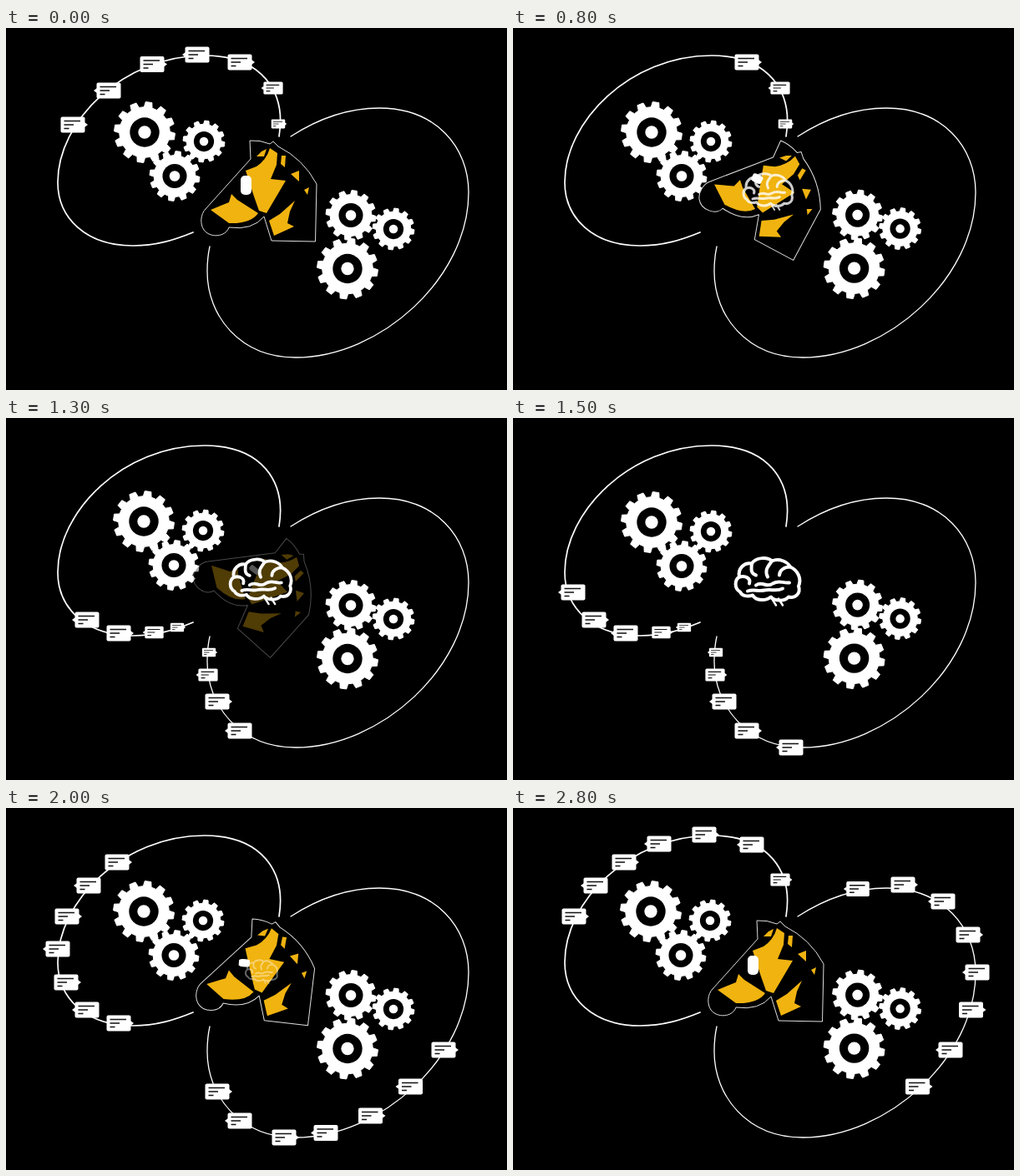
Recreate the animation shown at these times as an HTML page. Size 600 px wide and 434 px high, loop 3000 ms.

```html
<!DOCTYPE html>
<html lang="en">
<head>
<meta charset="utf-8">
<title>Thinking loops</title>
<style>
  html, body { margin: 0; width: 100%; height: 100%; overflow: hidden; background: #000; }
  svg { display: block; width: 100%; height: 100%; }
  .line { fill: none; stroke: #fff; stroke-linecap: round; stroke-linejoin: round; }
</style>
</head>
<body>
<svg viewBox="0 0 600 434">
  <defs>
    <g id="bubble">
      <rect x="-14.5" y="-9.5" width="29" height="19" rx="2" fill="#fff"/>
      <path d="M14-3L18 0 14 3Z" fill="#fff"/>
    </g>
    <path id="text" d="M-10.500-4.500H9M-10.500 0H1M-10.500 4.500H-4.500" stroke="#111" stroke-width="1.400"/>
  </defs>
  <path class="line" stroke-width="1.7" d="M327 130C336 75 305 33 238 33C140 33 62 112 62 185C62 228 96 261 152 261C180 261 202 254 224 245"/>
  <path class="line" stroke-width="1.3" d="M341 130C375 108 410 96 447 96C515 96 554 143 554 197C554 300 448 395 347 395C280 395 241 345 241 292C241 281 242 271 244 262"/>
  <g id="leftGears"></g>
  <g id="rightGears"></g>
  <g id="bubbles"></g>
  <g id="head">
    <path fill="#000" stroke="#ddd" stroke-width="1" stroke-linejoin="round" d="M293 157L292 135Q304 134 316 139L320 136 326 142Q356 157 372 187L370.500 256 318 255 309 226Q295 243 267 239C263 251 244 252 237 242C232 235 233 223 239 217Z"/>
    <g fill="#f0b310">
      <path d="M287 171L300 166Q312 158 316 144L325 150 324 164 317 181 335 183 312 222 303 219 297 202Z"/>
      <path d="M245 218L267 209 270 199 277 206 302 222Q293 235 267 234Z"/>
      <path d="M300 154L306 148 312 145 309 154Z"/>
      <path d="M330 153L335 153 334 167 329 163Z"/>
      <path d="M341 175L351 171 351 184Z"/>
      <path d="M357 194L363 191 361 200Z"/>
      <path d="M315 231L328 223 346 207 340 220 337 234 345 238 321 249Z"/>
    </g>
    <rect id="eye" x="-6.5" y="-11.5" width="13" height="23" rx="5" fill="#fff"/>
  </g>
  <g id="brain" class="line" stroke-width="4">
    <path d="M271 208C264 204 264 194 270 190C268 180 276 172 285 174C290 166 304 166 309 171C318 167 328 172 331 178C340 182 345 192 341 201C344 210 337 216 329 214C324 220 312 219 308 214C302 219 290 219 286 212C280 214 273 213 271 208Z"/>
    <path d="M285 174C284 182 284 186 290 188M309 171C304 178 300 182 304 190M270 190C278 188 284 192 282 198M290 200C298 194 302 204 310 198C318 193 322 198 330 197M331 178C324 178 318 182 318 188M280 207C288 204 292 208 300 206S314 208 322 204"/>
    <path stroke-width="2.500" d="M309 216L314 224M317 216L322 224"/>
  </g>
</svg>
<script>
const STEPS = 18, LOOP = 3000;
const $ = id => document.getElementById(id);

// Bubble stops along each loop: x, y and optional scale
const leftStops = [[205, 251, .56], [177.500, 257, .77], [135, 258], [97, 242], [72, 209], [62, 169], [73, 130],
  [99, 93], [133, 65], [175, 43], [229, 32], [286, 44], [320, 86, .8]];
const leftEndStops = [[80, 116], [123, 75], [175, 43.500], [229, 32], [280, 41], [320, 72, .8], [326, 115, .57]];
const rightStops = [[243, 281, .56], [242, 308, .8], [253, 340], [280, 375], [333, 395], [383, 389.500], [436.500, 369],
  [484.500, 334], [524, 290], [548.500, 242], [556, 197], [545, 152], [515, 112], [467, 92], [413, 97, .95]];

// step, neck x, neck y, angle, eye opening, head opacity, brain scale, brain opacity
const poses = [
  [0, 318, 255, 0, 1, 1, .4, 0],
  [3, 304, 255, 13, .72, 1, .6, .5],
  [6, 282, 253, 34, .3, 1, .85, .95],
  [9, 275, 252, 44, .3, 0, 1, 1],
  [11, 310, 255, 3, .17, 1, .51, .45],
  [14, 308, 254.500, 10.500, .86, 1, .47, .3],
  [17, 318, 255, 0, 1, 1, .4, 0]
];

function gear(x, y, r) {
  const teeth = 12, points = [];
  for (let i = 0; i < teeth; i++) {
    for (const [turn, size] of [[-.31, .83], [-.2, 1], [.2, 1], [.31, .83]]) {
      const a = (i + turn) / teeth * 2 * Math.PI + .14;
      points.push((x + Math.sin(a) * r * size).toFixed(2) + ',' + (y - Math.cos(a) * r * size).toFixed(2));
    }
  }
  return `<polygon points="${points.join(' ')}" fill="#fff" stroke="#fff" stroke-linejoin="round"/>
    <circle cx="${x}" cy="${y}" r="${r * .485}"/><circle cx="${x}" cy="${y}" r="${r * .21}" fill="#fff"/>`;
}

function bubble([x, y, scale = 1], tailRight) {
  const at = `translate(${x} ${y}) scale(${scale})`;
  return `<use href="#bubble" transform="${at} scale(${tailRight ? 1 : -1} 1)"/><use href="#text" transform="${at}"/>`;
}

function train(stops, first, last, phase) {
  return stops.map((stop, i) =>
    i >= first && i <= last ? bubble(stop, (i + phase) % 2 === 0) : '').join('');
}

function poseAt(step) {
  const i = Math.max(1, poses.findIndex(p => p[0] >= step));
  const a = poses[i - 1], b = poses[i], f = (step - a[0]) / (b[0] - a[0]);
  return a.map((v, n) => v + (b[n] - v) * f);
}

function render(step) {
  // The left loop pauses for one step near the end
  const leftStep = step === 0 ? 17 : step < 16 ? step : step - 1;
  const shift = Math.max(0, step - 1);
  let html = train(leftEndStops, shift, step < 8 ? 6 : -1, shift);
  if (step >= 7) {
    const front = s => Math.floor(1.2 * (s - 5) + 1e-6);
    html += train(leftStops, leftStep - 10, Math.min(leftStep - 4, front(leftStep)), leftStep);
    html += train(rightStops, step - 10, front(step), step);
  }
  $('bubbles').innerHTML = html;

  $('leftGears').setAttribute('transform', leftStep % 2 ? '' : 'translate(-1 -1)');
  $('rightGears').setAttribute('transform', step % 2 ? 'translate(-.4 -.4)' : '');

  const [, x, y, angle, eye, headAlpha, size, brainAlpha] = poseAt(step);
  $('head').setAttribute('transform', `translate(${x} ${y}) rotate(${angle}) translate(-318 -255)`);
  $('head').setAttribute('opacity', headAlpha);
  $('eye').setAttribute('transform', `translate(287.5 188.5) scale(1 ${eye})`);
  $('brain').setAttribute('transform', `translate(307 196.5) scale(${size}) translate(-306 -196)`);
  $('brain').setAttribute('opacity', brainAlpha);
}

$('leftGears').innerHTML = gear(166, 125, 36.500) + gear(237, 136, 25) + gear(202, 177.500, 30);
$('rightGears').innerHTML = gear(413, 224.500, 30) + gear(464, 241, 25) + gear(409, 288.500, 36.500);

const stepStart = k => Math.round(k * 10 / 6) * 100;
const start = performance.now();
let shown = -1;

function tick() {
  const t = Math.max(0, performance.now() - start) % LOOP;
  let step = STEPS - 1;
  while (stepStart(step) > t) step--;
  if (step !== shown) render(shown = step);
  requestAnimationFrame(tick);
}
tick();
</script>
</body>
</html>
```
